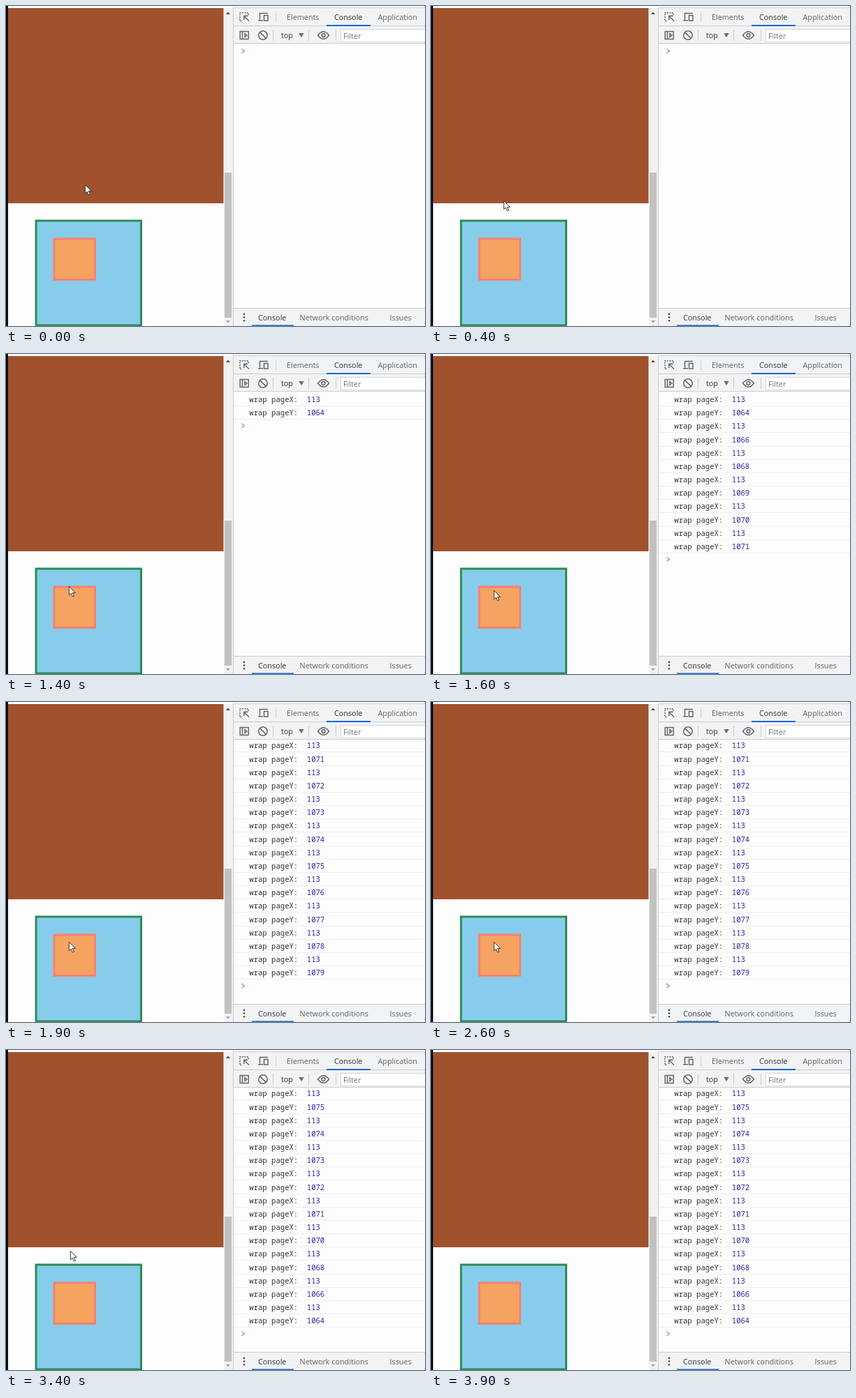
Animation of 600x459 px, one loop 4500 ms. Source, as an HTML page:

```html
<!DOCTYPE html>
<html lang="en">
<head>
<meta charset="utf-8">
<title>pageX and pageY</title>
<style>
  html, body { margin: 0; width: 100%; height: 100%; overflow: hidden; background: #fefefe; }
  svg { display: block; }
  text { font: 10.8px "Open Sans", "Noto Sans", sans-serif; fill: #5f6368; white-space: pre; }
  #log text { font: 10.6px "Noto Sans Mono", "DejaVu Sans Mono", monospace; fill: #303135; }
  #log .num { fill: #2a249f; }
  .icon { fill: none; stroke: #64686c; stroke-width: 1.5; }
  .rule { stroke: #cacdd1; }
</style>
</head>
<body>
<svg width="600" height="459" viewBox="0 0 600 459">
  <!-- page -->
  <rect width="600" height="459" fill="#fefdfe"/>
  <rect x="3" y="3" width="308.5" height="280" fill="#a0522d"/>
  <rect width="3" height="459" fill="#080f1c"/>
  <rect x="43" y="308" width="150.5" height="150" fill="#87cdeb" stroke="#2e8b57" stroke-width="3"/>
  <rect x="69" y="334" width="58.5" height="58.5" fill="#f4a460" stroke="#fa7f73" stroke-width="3"/>

  <!-- scrollbar -->
  <rect x="312" y="3" width="13" height="456" fill="#f1f1f1"/>
  <rect x="313" y="239" width="10" height="208" fill="#c1c1c1"/>
  <path d="M315 12l3-3.5 3 3.5z" fill="#505050"/>
  <path d="M315 451l3 3.5 3-3.5z" fill="#a3a3a3"/>

  <!-- console output -->
  <clipPath id="view"><rect x="326" y="54" width="274" height="379"/></clipPath>
  <g clip-path="url(#view)">
    <g id="log"></g>
    <path id="prompt" d="M337.5-3l4 3-4 3" fill="none" stroke="#6f9df0" stroke-width="1.3"/>
  </g>

  <!-- toolbars -->
  <path d="M325 3h275v51h-275zM325 433h275v26h-275z" fill="#f1f3f4"/>
  <path class="rule" d="M325 2.5h275M325 28.5h275M325 53.5h275M325 433.5h275M325.5 3v456M386.5 9v14M382.5 34v16M433.5 34v16M472.5 34v16"/>
  <path d="M459 28h63M352 458.5h60" stroke="#1a66d0" stroke-width="2"/>
  <rect x="479.5" y="33.5" width="130" height="18" fill="#fff" stroke="#d5d7da"/>

  <path class="icon" d="M347 13v-3.2h-12v11.7h3.5" stroke-dasharray="2 1.4"/>
  <path class="icon" d="M341 14.5l7 7M340.8 20v-5.7h5.7"/>
  <path class="icon" d="M375 10.5h-11.5v9M361 20.8h7M369.5 13.5h5.5v7.5h-5.5z"/>
  <path class="icon" d="M335.2 36.5h12v11h-12zM338.5 36.5v11M342 39.5l3 2.5-3 2.5z"/>
  <g class="icon">
    <circle cx="368" cy="42" r="6.2"/>
    <path d="M363.6 37.6l8.8 8.8"/>
    <path d="M446.5 42q8-10.5 16 0q-8 10.5-16 0z"/>
    <circle cx="454.5" cy="42" r="2.4"/>
  </g>
  <path d="M419.3 39h7.4l-3.7 6z" fill="#6a6e72"/>
  <g fill="#55595d">
    <circle cx="341" cy="442" r="1.4"/><circle cx="341" cy="446.7" r="1.4"/><circle cx="341" cy="451.4" r="1.4"/>
  </g>

  <text x="402" y="20">Elements</text>
  <text x="470" y="20" style="fill:#303338">Console</text>
  <text x="532.5" y="20">Application</text>
  <text x="394" y="46" style="fill:#303338">top</text>
  <text x="483" y="46.5" style="fill:#70757a">Filter</text>
  <text x="361" y="451" style="fill:#303338">Console</text>
  <text x="420.5" y="451">Network conditions</text>
  <text x="549.5" y="451">Issues</text>

  <path id="cursor" d="M0 0v12.6l2.9-2.7 2.2 4.8 2-.9-2.2-4.7h4z" fill="#fff" stroke="#222" stroke-width=".9"/>
</svg>
<script>
const LOOP = 4500, ROW = 19.17, FIRST = 65, LAST = 388.3;
const log = document.getElementById("log");
const prompt_ = document.getElementById("prompt");
const cursor = document.getElementById("cursor");

// pageY values reported on the way down, then on the way up
const values = [1064, 1066, 1068, 1069, 1070, 1071, 1071];
for (let v = 1072; v <= 1079; v++) values.push(v);
for (let v = 1078; v >= 1070; v--) values.push(v);
values.push(1068, 1066, 1064);

// [start ms, values logged so far]
const counts = [[0, 0], [1400, 1], [1500, 3], [1600, 6], [1700, 11], [1800, 14],
  [1900, 15], [3100, 19], [3200, 25], [3300, 27]];

// [ms, x, y] of the pointer tip
const path = [[0, 113, 256], [100, 112, 258], [300, 107, 271], [600, 98, 295], [800, 97, 304],
  [1000, 93, 313], [1200, 90, 323], [1400, 90, 333], [1600, 90, 339], [1900, 90, 344],
  [3000, 90, 344], [3100, 90, 341], [3200, 90, 335], [3300, 91, 318], [3400, 92, 288],
  [3500, 92, 272], [3600, 92, 258], [3800, 92, 240], [LOOP, 92, 240]];

function tipAt(t) {
  const i = path.findIndex(p => p[0] > t);
  const [a, b] = [path[i - 1], path[i]];
  const k = (t - a[0]) / (b[0] - a[0]);
  return [a[1] + (b[1] - a[1]) * k, a[2] + (b[2] - a[2]) * k];
}

function row(name, value, y) {
  return `<text x="348.3" y="${y + 4}">wrap ${name}:</text>` +
    `<text class="num" x="430.8" y="${y + 4}">${value}</text>` +
    `<path d="M326 ${Math.round(y + 9) + .5}h274" stroke="#efeff0"/>`;
}

let shown = -1;
function drawLog(count) {
  if (count === shown) return;
  shown = count;
  const end = FIRST + ROW * (count * 2 - 1);
  const shift = Math.max(0, end - LAST);
  let html = "";
  for (let i = 0; i < count; i++) {
    const y = FIRST + ROW * i * 2 - shift;
    if (y > 0) html += row("pageX", 113, y) + row("pageY", values[i], y + ROW);
  }
  log.innerHTML = html;
  prompt_.setAttribute("transform", `translate(0 ${count ? end - shift + 18.6 : 64.5})`);
}

function frame(now) {
  const t = Math.floor(now % LOOP / 100) * 100;
  drawLog(counts.findLast(c => c[0] <= t)[1]);
  const [x, y] = tipAt(t);
  cursor.setAttribute("transform", `translate(${Math.round(x) + .3} ${Math.round(y) + .3})`);
  cursor.style.display = t < 3900 ? "" : "none";
  requestAnimationFrame(frame);
}
frame(performance.now());
</script>
</body>
</html>
```
